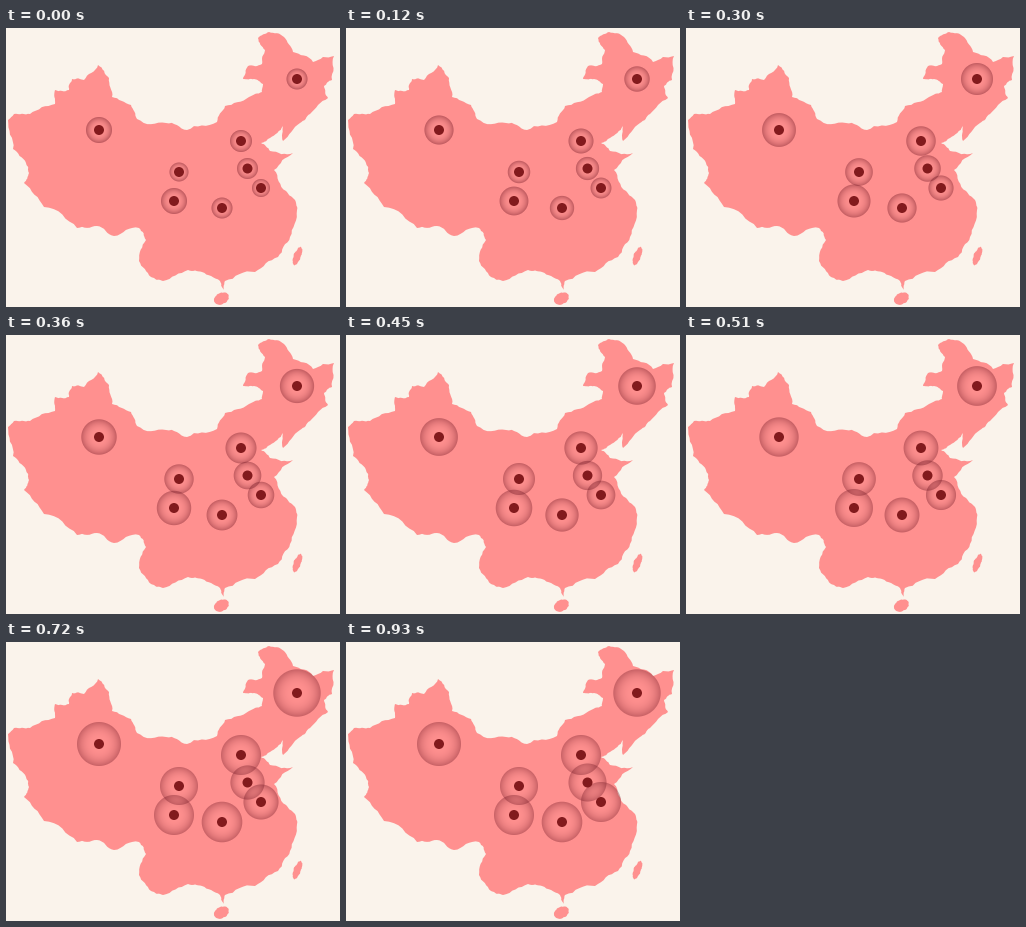
Write a matplotlib script that moves like this. It is 334 px wide and 279 px high and loops after 1060 ms.

```python
import random

import matplotlib.pyplot as plt
import numpy as np
from matplotlib.animation import FuncAnimation
from matplotlib.patches import Circle, Polygon

W, H, DPI = 334, 279, 64
LOOP_MS, TICK_MS, STEP_MS, LAST_STEP = 1060, 10, 30, 31
PAPER, LAND, DOT = "#faf3eb", "#ff908f", "#821a1d"
HALO = np.array([116, 26, 38]) / 255

# Key points of the land border, clockwise from the north-eastern top.
BORDER = [
    (252, 10), (263, 4), (278, 9), (287, 24), (307, 34), (328, 28), (326, 52),
    (318, 58), (322, 70), (304, 86), (294, 95), (277, 113), (277, 98),
    (264, 110), (255, 115), (264, 123), (287, 125), (268, 142), (280, 163),
    (288, 171), (291, 182), (284, 209), (272, 229), (249, 244), (219, 253),
    (218, 262), (214, 253), (196, 244), (182, 242), (157, 253), (145, 249),
    (133, 233), (140, 212), (133, 200), (108, 208), (91, 198), (71, 200),
    (38, 179), (18, 155), (23, 145), (20, 135), (7, 121), (2, 92), (8, 86),
    (24, 86), (49, 76), (49, 62), (63, 62), (66, 51), (78, 52), (92, 37),
    (103, 50), (106, 69), (125, 77), (131, 91), (160, 95), (181, 102),
    (211, 94), (219, 78), (243, 69), (256, 64), (257, 56), (248, 51),
    (237, 51), (242, 38), (256, 36), (259, 22),
]

# x, y, first radius, last radius, steps to grow
SITES = [
    (93, 102, 13, 22, 23),
    (291, 51, 10.5, 23.7, 24),
    (235, 113, 11, 20, 24),
    (241.5, 140.5, 10.5, 19, 31),
    (255, 160, 9, 20, 31),
    (173, 144, 9.5, 19, 22),
    (168, 173, 13, 20, 20),
    (216, 180, 10.5, 20.3, 24),
]


def roughen(points, rng, levels=3, amount=0.11):
    """Split and bend every edge again and again for a ragged border."""
    for _ in range(levels):
        finer = []
        for (x0, y0), (x1, y1) in zip(points, points[1:] + points[:1]):
            bend = rng.uniform(-amount, amount)
            finer += [(x0, y0),
                      ((x0 + x1) / 2 - bend * (y1 - y0),
                       (y0 + y1) / 2 + bend * (x1 - x0))]
        points = finer
    return points


def island(x, y, length, width, tilt):
    """Corner points of an oval whose long axis is turned by tilt degrees."""
    turn = np.exp(1j * np.radians(tilt))
    angles = np.linspace(0, 2 * np.pi, 10, endpoint=False)
    oval = (length * np.cos(angles) + 1j * width * np.sin(angles)) * turn
    return [(x + z.real, y + z.imag) for z in oval]


fig = plt.figure(figsize=(W / DPI, H / DPI), dpi=DPI, facecolor=PAPER)
ax = fig.add_axes([0, 0, 1, 1])
ax.axis("off")

rng = random.Random(4)
for shape in (BORDER, island(291.5, 228, 10, 3.6, -70),
              island(215.5, 270.5, 8, 5.8, -25)):
    ax.add_patch(Polygon(roughen(shape, rng), facecolor=LAND, linewidth=0,
                         zorder=1))

halo = np.zeros((H, W, 4))
halo[..., :3] = HALO
halo_image = ax.imshow(halo, interpolation="nearest", aspect="auto",
                       extent=(0, W, H, 0), zorder=2)
for x, y, *_ in SITES:
    ax.add_patch(Circle((x, y), 5, facecolor=DOT, linewidth=0, zorder=3))
ax.set(xlim=(0, W), ylim=(H, 0))

rows, cols = np.mgrid[:H, :W] + 0.5
DISTANCES = [np.hypot(cols - x, rows - y) for x, y, *_ in SITES]


def draw(frame):
    step = min(frame * TICK_MS // STEP_MS, LAST_STEP)
    clear = np.ones((H, W))
    for distance, (_, _, first, last, steps) in zip(DISTANCES, SITES):
        progress = min(step / steps, 1)
        radius = first + (last - first) * progress
        strength = 0.48 - 0.08 * progress
        inside = np.clip(radius - distance + 0.5, 0, 1)
        shade = np.minimum(distance / radius, 1) ** 3
        clear *= 1 - strength * shade * inside
    halo[..., 3] = 1 - clear
    halo_image.set_data(halo)
    return [halo_image]


anim = FuncAnimation(fig, draw, frames=LOOP_MS // TICK_MS, interval=TICK_MS,
                     repeat=True, repeat_delay=0, blit=False)
plt.show()
```
